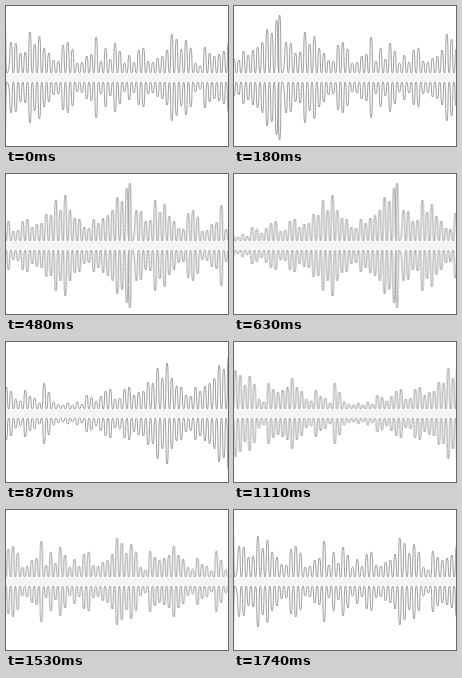
An HTML page that plays this animation: 222x140 px, repeating every 1770 ms.

```html
<!DOCTYPE html>
<html lang="en">
<head>
<meta charset="utf-8">
<title>Waveform</title>
<style>
  html, body { margin: 0; width: 100%; height: 100%; overflow: hidden; background: #fff; }
  svg { display: block; width: 222px; height: 140px; }
  #tape { animation: scroll 1770ms infinite; }
  /* 58 moves of 30 ms, then one step of rest */
  @keyframes scroll {
    0% { transform: translateX(0); animation-timing-function: steps(58, end); }
    98.3051%, 100% { transform: translateX(454px); }
  }
  .wave { fill: #fdfdfd; stroke: #858585; stroke-width: .8; }
  .core { fill: #f4f4f4; }
</style>
</head>
<body>
<svg viewBox="0 0 222 140">
  <g id="tape">
    <path class="wave" id="upper"/>
    <path class="wave" id="lower"/>
    <rect class="core" x="-460" y="67.5" width="690" height="8"/>
  </g>
</svg>
<script>
  const WIDTH = 454, MID = 71.5, VALLEY = 4.5;
  // Top edge of each peak along one period
  const tops = [
    9, 36, 37, 47, 46, 26, 38, 30, 42, 47, 54, 55, 39, 36, 43, 57,
    56, 50, 48, 31, 55, 42, 53, 37, 45, 57, 49, 56, 44, 42, 55, 56,
    52, 50, 44, 28, 33, 43, 34, 42, 57, 60, 41, 47, 50, 48, 45, 36,
    45, 49, 57, 59, 48, 54, 56, 61, 41, 50, 60, 62, 63, 61, 63, 60,
    62, 53, 55, 59, 54, 49, 47, 57, 56, 47, 45, 53, 50, 49, 40, 41,
    26, 36, 21, 36, 44, 45, 53, 54, 45, 49, 44, 41, 36, 23, 27, 14
  ];
  const count = tops.length, pitch = WIDTH / count;

  function trace(side) {
    const base = MID + side * VALLEY;
    let d = `M${-WIDTH - pitch / 2} ${base}`;
    for (let i = -count; i < count / 2 + 1; i++) {
      const k = (i + count) % count;
      const x = i * pitch + (k ? 0.3 : -1.4);
      const y = MID + side * (MID - tops[k]);
      const end = x + pitch / 2;
      d += `C${x - 0.6} ${base} ${x - 1.8} ${y} ${x} ${y}`;
      d += `C${x + 1.8} ${y} ${x + 0.6} ${base} ${end} ${base}`;
    }
    return d;
  }

  document.getElementById("upper").setAttribute("d", trace(-1));
  document.getElementById("lower").setAttribute("d", trace(1));
</script>
</body>
</html>
```
